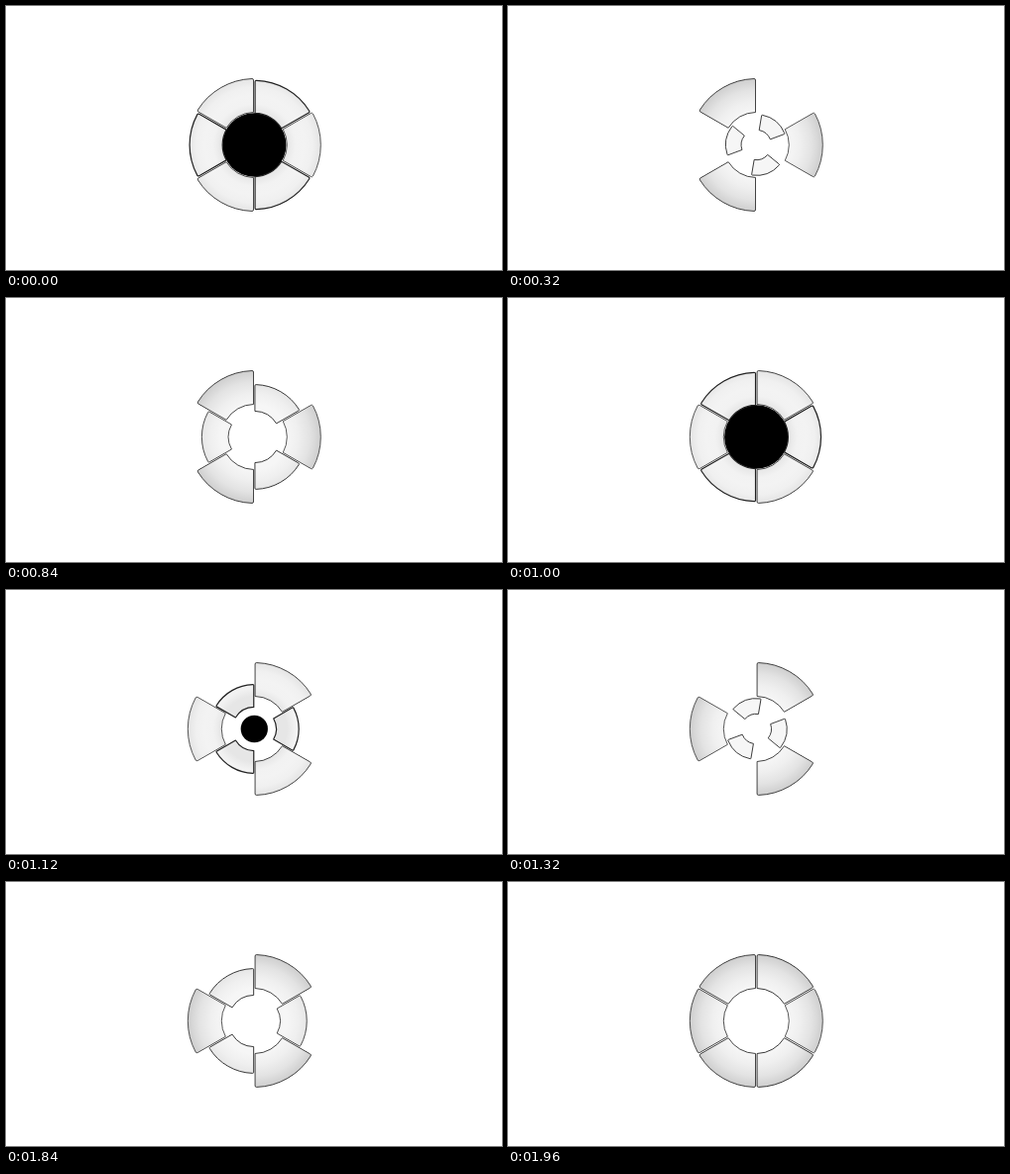
These frames come from a looping animation (500 by 267 pixels, 2000 ms). An HTML page with a canvas:

```html
<!DOCTYPE html>
<html lang="en">
<head>
<meta charset="utf-8">
<title>Ring of sectors</title>
<style>
html, body { margin: 0; width: 100%; height: 100%; overflow: hidden; background: #fff; }
canvas { display: block; }
</style>
</head>
<body>
<canvas id="stage" width="500" height="267"></canvas>
<script>
const ctx = document.getElementById('stage').getContext('2d');
const TAU = Math.PI * 2;
const CX = 250.3, CY = 140.5;
const OUTER = 67, INNER = 33, GAP = 0.8, ROUND = 1.5;
const SMALL = 0.46;
const LOOP = 2000, HALF = 1000, STEP = 40;
const SHRINK = 280, SPIN = 440;
const GREY = ['#f6f6f6', '#efefef', '#e3e3e3', '#cecece'];
const PALE = ['#e6e6e6', '#f2f2f2', '#f3f3f3', '#f0f0f0', '#e4e4e4'];

const clamp = v => Math.min(1, Math.max(0, v));
const ease = v => (1 - Math.cos(Math.PI * clamp(v))) / 2;

// One sector, centred on the positive x axis, with slightly rounded outer corners.
function makeSector() {
  const p = new Path2D();
  const a = TAU / 12 - Math.asin(GAP / OUTER);
  const b = TAU / 12 - Math.asin(GAP / INNER);
  const trim = ROUND / OUTER;
  const at = (r, ang) => [r * Math.cos(ang), r * Math.sin(ang)];
  p.arc(0, 0, OUTER, -a + trim, a - trim);
  p.quadraticCurveTo(...at(OUTER, a), ...at(OUTER - ROUND, a));
  p.lineTo(...at(INNER, b));
  p.arc(0, 0, INNER, b, -b, true);
  p.lineTo(...at(OUTER - ROUND, -a));
  p.quadraticCurveTo(...at(OUTER, -a), ...at(OUTER, -a + trim));
  p.closePath();
  return p;
}

// The light falls off with distance from the centre of the stage, whatever the sector's scale.
function makeShade(stops, scale) {
  const g = ctx.createRadialGradient(0, 0, INNER / scale, 0, 0, OUTER / scale);
  stops.forEach((c, i) => g.addColorStop(i / (stops.length - 1), c));
  return g;
}

const sector = makeSector();

function drawGroup(start, scale, turn, line, stops) {
  const shade = makeShade(stops, scale);
  for (let i = 0; i < 3; i++) {
    ctx.save();
    ctx.translate(CX, CY);
    ctx.rotate(start + turn + i * TAU / 3);
    ctx.scale(scale, scale);
    ctx.fillStyle = shade;
    ctx.fill(sector);
    ctx.strokeStyle = '#222';
    ctx.lineJoin = 'round';
    ctx.lineWidth = line / scale;
    ctx.stroke(sector);
    ctx.restore();
  }
}

function draw(time) {
  const t = Math.floor((time % LOOP) / STEP) * STEP;
  const local = (t + STEP) % HALF;
  const second = t >= HALF - STEP && t < LOOP - STEP;
  const shrink = ease(local / SHRINK);
  const spin = ease((local - SHRINK) / SPIN);
  const grow = ease((local - SHRINK - SPIN) / SHRINK);
  const scale = 1 - (1 - SMALL) * (shrink - grow);
  const closing = local > 0 && local < SHRINK;
  const stops = closing ? PALE : GREY;

  ctx.fillStyle = '#fff';
  ctx.fillRect(0, 0, 500, 267);

  if (closing) {
    ctx.fillStyle = '#000';
    ctx.beginPath();
    ctx.arc(CX, CY, INNER * (1 - shrink) + 0.8, 0, TAU);
    ctx.fill();
  }

  const moving = second ? 0 : TAU / 6;
  drawGroup(TAU / 6 - moving, 1, 0, 0.75, stops);
  drawGroup(moving, scale, spin * TAU / 3, closing ? 1.2 : 0.8, stops);
}

function tick() {
  draw(performance.now());
  requestAnimationFrame(tick);
}
tick();
</script>
</body>
</html>
```
